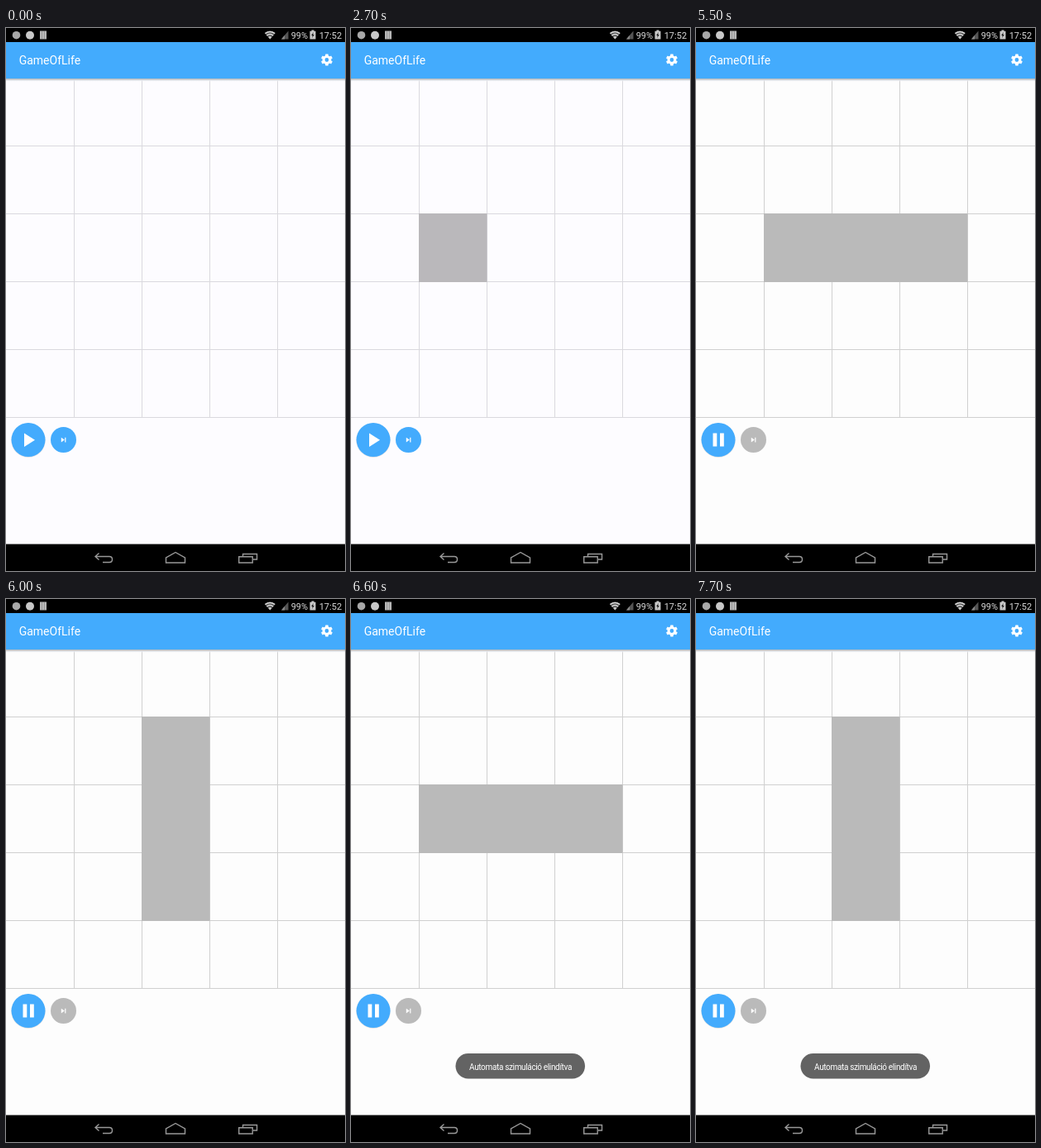
An HTML page that plays this animation: 410 px wide and 656 px high, repeating every 8 s.

```html
<!DOCTYPE html>
<html lang="hu">
<head>
<meta charset="utf-8">
<title>GameOfLife</title>
<style>
html, body { margin: 0; width: 100%; height: 100%; overflow: hidden; background: #000; }
svg { display: block; width: 410px; height: 656px; }
text { font-family: Roboto, "Noto Sans", sans-serif; }
</style>
</head>
<body>
<svg viewBox="0 0 410 656">
  <defs>
    <linearGradient id="shade" x2="0" y2="1">
      <stop stop-color="#a9b0b6"/>
      <stop offset=".5" stop-color="#dfe0e3"/>
      <stop offset="1" stop-color="#fdfcff" stop-opacity="0"/>
    </linearGradient>
  </defs>
  <rect id="page" y="17" width="410" height="607"/>
  <g id="lines"></g>
  <g id="cells"></g>

  <rect y="61" width="410" height="4" fill="url(#shade)"/>
  <rect y="17" width="410" height="44" fill="#43abfd"/>
  <text x="15.7" y="44" font-size="14" fill="#fff">GameOfLife</text>
  <g id="gear" transform="translate(388 38.5)" fill="#fff">
    <circle r="3.9" fill="none" stroke="#fff" stroke-width="3"/>
  </g>

  <rect width="410" height="17"/>
  <g fill="#c8c8c8">
    <circle cx="12.5" cy="8.7" r="4.8" fill="#a8a8a8"/>
    <circle cx="29" cy="8.7" r="5"/>
    <path d="M41 3.5h8v10h-8z" fill="#b8b8b8"/>
    <path d="M43.5 4v9M46.5 4v9" stroke="#888" stroke-width=".6"/>
    <path d="M319.3 13.5l-6.6-7.4q6.6-5 13.2 0z" fill="#555"/>
    <path d="M319.3 13.5l-2.2-2.5q2.2-1.8 4.4 0z"/>
    <path d="M313.5 6.7q5.8-4.3 11.6 0M315.4 9.1q3.9-3 7.8 0" fill="none" stroke="#ddd" stroke-width="1.5"/>
    <path d="M333 13.5l8.5-10v10z" fill="#555"/>
    <path d="M333 13.5l4-4.7v4.7z" fill="#888"/>
    <path d="M369.5 2.5h3v1.3h2v9.7h-7V3.800h2z"/>
    <path d="M371.8 5l-2.500 4h1.500l-.6 3 2.500-4h-1.500z" fill="#111"/>
    <g font-size="11" fill="#d8d8d8">
      <text x="344.7" y="13">99%</text>
      <text x="378.700" y="13">17:52</text>
    </g>
  </g>

  <circle cx="27" cy="498.200" r="20.7" fill="#000" opacity=".1"/>
  <circle cx="27" cy="497.500" r="20.500" fill="#43abfd"/>
  <path id="play" d="M22 489.500v16.500l13-8.250z" fill="#fff"/>
  <path id="pause" d="M20.500 489.500h4.800v16h-4.800zM29 489.500h4.800v16H29z" fill="#fff"/>
  <circle id="step" cx="69.500" cy="497.500" r="15.500"/>
  <path d="M66.800 494.800v5.600l4-2.800zM71.200 494.800h1.200v5.600h-1.200z" fill="#fff"/>

  <g id="toast">
    <rect x="126.500" y="549" width="156.500" height="30.500" rx="15.250" fill="#636363"/>
    <text x="205" y="568.700" font-size="10" letter-spacing="-.35" text-anchor="middle" fill="#fff">Automata szimuláció elindítva</text>
  </g>

  <rect y="623.500" width="410" height="32.500"/>
  <g fill="none" stroke="#999" stroke-width="1.400">
    <path d="M112.500 634.500l-4.500 4 4.500 4M108.500 638.500h16.500q3.500 0 3.500 3.500t-3.500 3.500h-8"/>
    <path d="M193.500 646v-6l11.500-6.500 11.500 6.500v6z"/>
    <path d="M281.700 638.700h16.500v7.300h-16.500zM286.500 638v-2.500h17v6.500h-4.500"/>
  </g>
</svg>
<script>
const LOOP = 8000;
const CELL = 82;
const START = 5500;
const FLIPS = [5700, 6200, 6700, 7200, 7600];
const TAPS = [2700, 3100, 3700];
const ROW = [[1, 2], [2, 2], [3, 2]];
const COLUMN = [[2, 1], [2, 2], [2, 3]];

const $ = id => document.getElementById(id);

function addRect(parent, attrs) {
  const rect = document.createElementNS("http://www.w3.org/2000/svg", "rect");
  for (const key in attrs) rect.setAttribute(key, attrs[key]);
  return parent.appendChild(rect);
}

for (let i = 1; i <= 5; i++) {
  if (i < 5) addRect($("lines"), { x: i * CELL, y: 61, width: 1, height: 410 });
  addRect($("lines"), { x: 0, y: 60 + i * CELL, width: 410, height: 1 });
}

for (let i = 0; i < 6; i++) {
  addRect($("gear"), { x: -1.8, y: -7, width: 3.6, height: 3, rx: .4, transform: `rotate(${i * 60})` });
}

const squares = ROW.map(() => addRect($("cells"), { width: CELL + .5, height: CELL + 1 }));

function show(id, visible) {
  $(id).setAttribute("visibility", visible ? "visible" : "hidden");
}

function render(t) {
  const running = t >= START;
  const flips = FLIPS.filter(time => t >= time).length;
  const live = flips % 2 ? COLUMN : ROW;

  squares.forEach((square, i) => {
    square.setAttribute("x", live[i][0] * CELL);
    square.setAttribute("y", 60 + live[i][1] * CELL);
    square.setAttribute("visibility", t >= TAPS[i] ? "visible" : "hidden");
  });

  $("page").setAttribute("fill", running ? "#fdfdfd" : "#fdfcff");
  $("lines").setAttribute("fill", running ? "#d0d0d0" : "#dad9de");
  $("cells").setAttribute("fill", running ? "#bababa" : "#bab8bb");
  $("step").setAttribute("fill", running ? "#bababa" : "#43abfd");
  show("play", !running);
  show("pause", running);
  $("toast").setAttribute("opacity", Math.min(1, Math.max(0, (t - 6100) / 400)));
}

const origin = performance.now();
function tick() {
  render((performance.now() - origin) % LOOP);
  requestAnimationFrame(tick);
}
tick();
</script>
</body>
</html>
```
